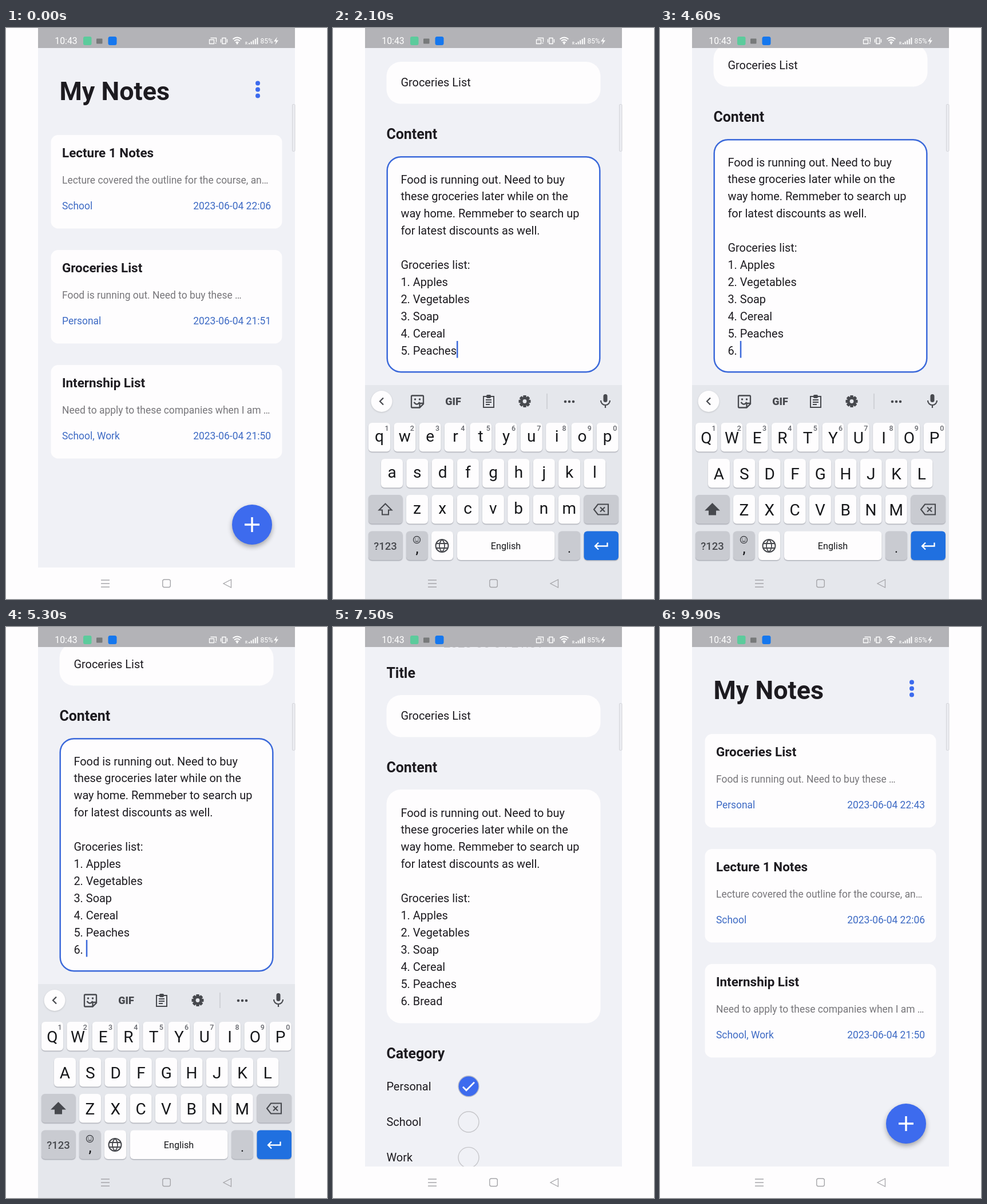
Recreate the animation shown at these times as an HTML page with a canvas. Size 561 by 998 pixels, loop 10 s.

```html
<!DOCTYPE html>
<html lang="en">
<head>
<meta charset="utf-8">
<title>Notes app</title>
<style>
html, body { margin: 0; width: 100%; height: 100%; overflow: hidden; background: #fefdfe; }
canvas { display: block; width: 561px; height: 998px; }
</style>
</head>
<body>
<canvas id="stage"></canvas>
<script>
const W = 561, H = 998, LOOP = 10000, STEP = 100;
const LEFT = 56, RIGHT = 505, TOP = 35, BOTTOM = 943;
const PAPER = '#fefdfe', BG = '#f0f1f6', INK = '#1d1b20', BLUE = '#3d6bee', LINK = '#3d6ac4';
const KEY_INK = '#17181b', ICON = '#47494e', DARK_KEY = '#c9cbd1', LINE = 29.95;

const canvas = document.getElementById('stage');
const ratio = window.devicePixelRatio || 1;
canvas.width = Math.round(W * ratio);
canvas.height = Math.round(H * ratio);
const c = canvas.getContext('2d');

const NOTE = ['Food is running out. Need to buy', 'these groceries later while on the',
  'way home. Remmeber to search up', 'for latest discounts as well.', '', 'Groceries list:',
  '1. Apples', '2. Vegetables', '3. Soap', '4. Cereal', '5. Peaches'];
const CARDS = {
  lecture: ['Lecture 1 Notes', 'Lecture covered the outline for the course, an…', 'School', '22:06'],
  food: ['Groceries List', 'Food is running out. Need to buy these …', 'Personal', '21:51'],
  foodNew: ['Groceries List', 'Food is running out. Need to buy these …', 'Personal', '22:43'],
  intern: ['Internship List', 'Need to apply to these companies when I am …', 'School, Work', '21:50']
};
// time at which each state of the new line appears
const TYPED = [[2500, ''], [3600, '6'], [4200, '6.'], [4600, '6. '], [5500, '6. B'],
  [5700, '6. Br'], [5900, '6. Bre'], [6100, '6. Brea'], [6400, '6. Bread']];
const HINTS = { B: ['But', 'By'], Br: ['Bring', 'Broken'], Bre: ['Break', 'Bread'],
  Brea: ['Bread', 'Breaded'], Bread: ['Bread', 'Breads'] };
// scroll keys: time, offset
const SCROLL = [[1600, 0], [2000, 178], [2400, 178], [2600, 208], [7400, 208], [7500, 118],
  [7600, 44], [7700, 20], [8200, 20], [8300, 12], [8400, 4], [8500, 0]];

const clamp = v => Math.max(0, Math.min(1, v));
const ease = v => 1 - Math.pow(1 - clamp(v), 3);
const span = (t, a, b) => ease((t - a) / (b - a));

function scrollAt(t) {
  if (t <= SCROLL[0][0]) return 0;
  for (let i = 1; i < SCROLL.length; i++) {
    const [a, from] = SCROLL[i - 1], [b, to] = SCROLL[i];
    if (t <= b) return from + (to - from) * (t - a) / (b - a);
  }
  return 0;
}

function font(size, weight = 400) { c.font = `${weight} ${size}px Roboto, sans-serif`; }

function text(s, x, y, size, color = INK, weight = 400, align = 'left') {
  font(size, weight);
  c.fillStyle = color;
  c.textAlign = align;
  c.fillText(s, x, y);
}

function box(x, y, w, h, r, fill, stroke, width) {
  c.beginPath();
  c.roundRect(x, y, w, h, r);
  if (fill) { c.fillStyle = fill; c.fill(); }
  if (stroke) { c.strokeStyle = stroke; c.lineWidth = width; c.stroke(); }
}

function disc(x, y, r, fill, stroke, width = 1.5) {
  c.beginPath();
  c.arc(x, y, r, 0, 7);
  if (fill) { c.fillStyle = fill; c.fill(); }
  if (stroke) { c.strokeStyle = stroke; c.lineWidth = width; c.stroke(); }
}

function path(d, x, y, color, width, fill) {
  c.save();
  c.translate(x, y);
  const p = new Path2D(d);
  if (fill) { c.fillStyle = fill; c.fill(p); }
  if (width) { c.strokeStyle = color; c.lineWidth = width; c.stroke(p); }
  c.restore();
}

function shadow(color, blur, y, draw) {
  c.save();
  c.shadowColor = color;
  c.shadowBlur = blur * ratio;
  c.shadowOffsetY = y * ratio;
  draw();
  c.restore();
}

function clip(x, y, w, h) {
  c.beginPath();
  c.rect(x, y, w, h);
  c.clip();
}

function dots(x, y) {
  for (let i = -1; i < 2; i++) disc(x, y + i * 11, 4, BLUE);
}

function listPage(order) {
  c.fillStyle = BG;
  c.fillRect(LEFT, TOP, RIGHT - LEFT, BOTTOM - TOP);
  text('My Notes', 93.4, 126, 44.9, INK, 700);
  dots(440, 107.5);
  order.forEach((name, i) => {
    const [title, body, tag, time] = CARDS[name], y = 187 + i * 201;
    box(78.5, y, 404, 163.5, 12.5, PAPER);
    text(title, 98, y + 39, 22.45, INK, 700);
    text(body, 98, y + 85, 17.46, '#77767a');
    text(tag, 98, y + 130, 17.46, LINK);
    text('2023-06-04 ' + time, 463, y + 130, 17.46, LINK, 400, 'right');
  });
  shadow('rgba(0,0,0,.32)', 9, 4, () => disc(430, 868, 35, BLUE));
  path('M-13 0H13M0 -13V13', 430, 868, '#fff', 3.4);
}

function category(name, y, on) {
  text(name, 93.4, y + 7, 19.95);
  disc(237, y, 18, on ? BLUE : null, on ? '#b9bcc8' : '#c6c6ca', 1.4);
  if (on) path('M-10 1L-4 7L10 -7', 237, y, '#fff', 2.7);
}

function detailPage(offset, line, focused) {
  c.fillStyle = BG;
  c.fillRect(LEFT, TOP, RIGHT - LEFT, BOTTOM - TOP);
  c.save();
  c.translate(0, -offset);
  path('M15 0H-13M0 -13L-13 0L0 13', 116, 102.5, '#050505', 3.4);
  dots(440, 104.7);
  text('2023-06-04 21:51', 280, 153.5, 22.45, '#c5c4c8', 400, 'center');
  text('Title', 93.4, 207, 24.94, INK, 700);
  box(93.5, 237, 374, 73.5, 25, PAPER);
  text('Groceries List', 118.4, 280, 19.95);
  text('Content', 93.4, 372, 24.94, INK, 700);

  const lines = line === null ? NOTE : NOTE.concat(line);
  const h = lines.length * LINE + 49;
  if (focused) box(94.7, 403.2, 371.6, h - 2.4, 24, PAPER, '#3b69da', 2.5);
  else box(93.5, 402, 374, h, 25, PAPER);
  lines.forEach((s, i) => text(s, 118.4, 449.5 + i * LINE, 19.95));
  if (focused) {
    const last = lines[lines.length - 1], base = 449.5 + (lines.length - 1) * LINE;
    const end = 118.4 + c.measureText(last).width;
    if (last.length > 3 && line) {
      const start = 118.4 + c.measureText('6. ').width;
      c.fillStyle = INK;
      c.fillRect(start, base + 2.5, end - start, 1.3);
    }
    c.fillStyle = '#3b69da';
    c.fillRect(end, base - 24, 2.5, 29.5);
  }
  const shift = (lines.length - NOTE.length) * LINE;
  text('Category', 93.4, 842 + shift, 24.94, INK, 700);
  ['Personal', 'School', 'Work'].forEach((s, i) => category(s, 890.8 + shift + i * 62.3, i === 0));
  c.restore();
}

function key(x, y, w, fill = PAPER) {
  shadow('rgba(60,64,75,.38)', 1.5, 1.2, () => box(x, y, w, 50.5, 6, fill));
}

function keyRow(chars, x0, y, lift, numbered) {
  [...chars].forEach((ch, i) => {
    const x = x0 + i * 44.3;
    key(x - 19, y, 38);
    text(ch, x, y + 36 - lift, 28, KEY_INK, 400, 'center');
    if (numbered) text(String((i + 1) % 10), x + 13, y + 14, 12.5, '#66686e', 500, 'center');
  });
}

function mic(x, y) {
  box(x - 3.5, y - 12, 7, 14, 3.5, ICON);
  path('M-8 -1A8 8 0 0 0 8 -1M0 7V12', x, y, ICON, 2.2);
}

function toolbar(word) {
  const hints = HINTS[word];
  shadow('rgba(0,0,0,.16)', 3, 1, () => disc(85, 652.5, 18.5, PAPER));
  path(hints ? 'M-3 -6L3 0L-3 6' : 'M3 -6L-3 0L3 6', 85, 652.5, ICON, 2.2);
  mic(476, 652);
  c.fillStyle = '#c2c4c9';
  if (hints) {
    for (const x of [219, 340, 394]) c.fillRect(x - .6, 638, 1.2, 29);
    hints.forEach((s, i) => text(s, i ? 279 : 164, 661, 22.45, '#4b4d52', 400, 'center'));
    return;
  }
  c.fillRect(373.4, 639, 1.2, 27);
  path('M-9 -10.5H9Q10.5 -10.5 10.5 -9V4L4 10.5H-9Q-10.5 10.5 -10.5 9V-9Q-10.5 -10.5 -9 -10.5ZM10 3H4V10M-6 1Q-1 8 4 1', 147.5, 653, ICON, 2.3);
  disc(143.5, 649, 1.7, ICON);
  disc(151.5, 649, 1.7, ICON);
  text('GIF', 210, 659, 18, ICON, 900, 'center');
  path('M-9 -9H9V10H-9ZM-5 -3H5M-5 1H5M-5 5H2', 272, 653, ICON, 2);
  box(268, 641, 8, 6, 2, ICON);
  for (let i = 0; i < 4; i++) {
    c.save();
    c.translate(335, 652.5);
    c.rotate(i * Math.PI / 4);
    box(-2.8, -10.5, 5.6, 21, 1, ICON);
    c.restore();
  }
  disc(335, 652.5, 5.6, null, ICON, 4.6);
  disc(335, 652.5, 3.4, '#e5e7ec');
  for (let i = -1; i < 2; i++) disc(413 + i * 7, 653, 2.3, ICON);
}

function keyboard(mode, word) {
  const symbols = mode === 'symbols', lower = mode === 'lower';
  const show = s => lower ? s.toLowerCase() : s;
  const lift = lower ? 3 : 0;
  c.fillStyle = '#e5e7ec';
  c.fillRect(LEFT, 624, RIGHT - LEFT, H - 624);
  toolbar(word);
  keyRow(symbols ? '1234567890' : show('QWERTYUIOP'), 81, 690, lift, !symbols);
  keyRow(symbols ? '@#£_&-+()/' : show('ASDFGHJKL'), symbols ? 81 : 103, 753, lift);
  keyRow(symbols ? '*"\':;!?' : show('ZXCVBNM'), 147, 816, lift);

  key(62, 816, 59.5, DARK_KEY);
  if (symbols) text('=\\<', 92, 847, 16.5, ICON, 500, 'center');
  else path('M0 -10L11 1H5.5V9H-5.5V1H-11Z', 91.5, 841.5, ICON, 2, lower ? null : ICON);
  key(438.5, 816, 60.5, DARK_KEY);
  path('M-6 -9H12V9H-6L-13 0ZM-2 -4L6 4M6 -4L-2 4', 469, 841.5, ICON, 2.1);

  key(62, 879.5, 59.5, DARK_KEY);
  text(symbols ? 'ABC' : '?123', 91.5, 911.5, 18.5, ICON, 500, 'center');
  key(128, 879.5, 37.5, DARK_KEY);
  text(',', 147, symbols ? 917 : 918, symbols ? 25 : 23, KEY_INK, 500, 'center');
  key(172, 879.5, 38);
  if (symbols) {
    text('1 2', 191, 902.5, 14, ICON, 500, 'center');
    text('3 4', 191, 917, 14, ICON, 500, 'center');
  } else {
    disc(146.5, 894.5, 6, null, ICON, 1.4);
    path('M-3 1.5Q0 4.5 3 1.5M-2.5 -2V-.5M2.5 -2V-.5', 146.5, 894.5, ICON, 1.4);
    disc(190.5, 905, 11, null, ICON, 2);
    path('M-10 -4H10M-10 4H10M0 -11C-6 -5 -6 5 0 11C6 5 6 -5 0 -11', 190.5, 905, ICON, 1.8);
  }
  key(217, 879.5, 170.5);
  text('English', 302, 911, 16.2, KEY_INK, 400, 'center');
  key(394, 879.5, 38, DARK_KEY);
  text('.', 413, 917, 23, KEY_INK, 400, 'center');
  key(438.5, 879.5, 60.5, '#2070e0');
  path('M11 -6V0H-10M-4.5 -6L-10.5 0L-4.5 6', 468.5, 905.5, '#fff', 2.3);
}

function statusBar() {
  c.fillStyle = '#b3b3b7';
  c.fillRect(LEFT, 0, RIGHT - LEFT, TOP);
  text('10:43', 85.3, 28, 15.8, '#fff');
  box(135, 15, 14.5, 15, 3, '#5ccb9c');
  box(158, 18.5, 10.5, 9, 1, '#77797a');
  box(178.5, 15, 15, 15, 3.5, '#1577ee');
  path('M-4 -5H6V2M-6 -2H2V5H-6ZM4 4H6', 361.5, 22.5, '#fff', 1.3);
  path('M-3 -5H3V5H-3ZM-5.5 -3V3M5.5 -3V3', 381, 22.5, '#fff', 1.4);
  path('M-7.5 -3Q0 -9 7.5 -3M-5 0Q0 -4 5 0M-2.5 3Q0 1 2.5 3', 404, 22.5, '#fff', 1.7);
  disc(404, 27, 1.5, '#fff');
  text('R', 418, 29, 6.5, '#fff', 500);
  c.fillStyle = '#fff';
  for (let i = 0; i < 5; i++) c.fillRect(424 + i * 3.6, 26 - i * 2.3, 2, 2.5 + i * 2.3);
  text('85%', 444.5, 26.7, 12, '#fff');
  path('M2 -7L-4 1H0L-2 7L4 -1H0Z', 472, 22.5, '#fff', 0, '#fff');
}

function navIcons() {
  path('M-7.5 -6H7.5M-7.5 0H7.5M-7.5 6H7.5', 173.5, 971, '#a5a5a9', 1.3);
  box(273.8, 964, 13.5, 13.5, 3, null, '#a5a5a9', 1.4);
  path('M6.5 -7V7L-7 0Z', 387, 971, '#a5a5a9', 1.3);
}

// page scaled about the centre of the app area, faded by k
function zoomed(k, draw) {
  const s = .88 + .12 * k;
  c.save();
  c.globalAlpha = k;
  c.translate(280.5, 489);
  c.scale(s, s);
  c.translate(-280.5, -489);
  draw();
  c.restore();
}

function keyMode(t) {
  if (t < 2500) return 'lower';
  if (t < 3000) return 'upper';
  if (t < 4600) return 'symbols';
  return t < 5500 ? 'upper' : 'lower';
}

function render(t) {
  let line = null;
  for (const [at, s] of TYPED) if (t >= at) line = s;
  const open = t < 9000 ? span(t, 200, 600) : 1 - span(t, 8900, 9300);
  const kb = span(t, 1500, 1900) - clamp((t - 6600) / 400);
  const focused = t >= 1500 && t < 6800;

  c.setTransform(ratio, 0, 0, ratio, 0, 0);
  c.globalAlpha = 1;
  c.fillStyle = PAPER;
  c.fillRect(0, 0, W, H);

  c.save();
  clip(LEFT, TOP, RIGHT - LEFT, BOTTOM - TOP);
  if (open < 1) listPage(t < 5000 ? ['lecture', 'food', 'intern'] : ['foodNew', 'lecture', 'intern']);
  if (open > 0) zoomed(open, () => detailPage(scrollAt(t), line, focused));
  c.restore();

  box(500.5, 133.5, 4.5, 82, 1.5, '#ebecf1', '#d3d4d9', 1);
  statusBar();

  if (kb > 0) {
    c.save();
    clip(LEFT, TOP, RIGHT - LEFT, H - TOP);
    c.translate(0, (1 - kb) * (H - 624));
    keyboard(keyMode(t), line ? line.slice(3) : '');
    c.restore();
  }
  navIcons();
}

function tick(now) {
  render(Math.floor(now % LOOP / STEP) * STEP);
  requestAnimationFrame(tick);
}
requestAnimationFrame(tick);
</script>
</body>
</html>
```
